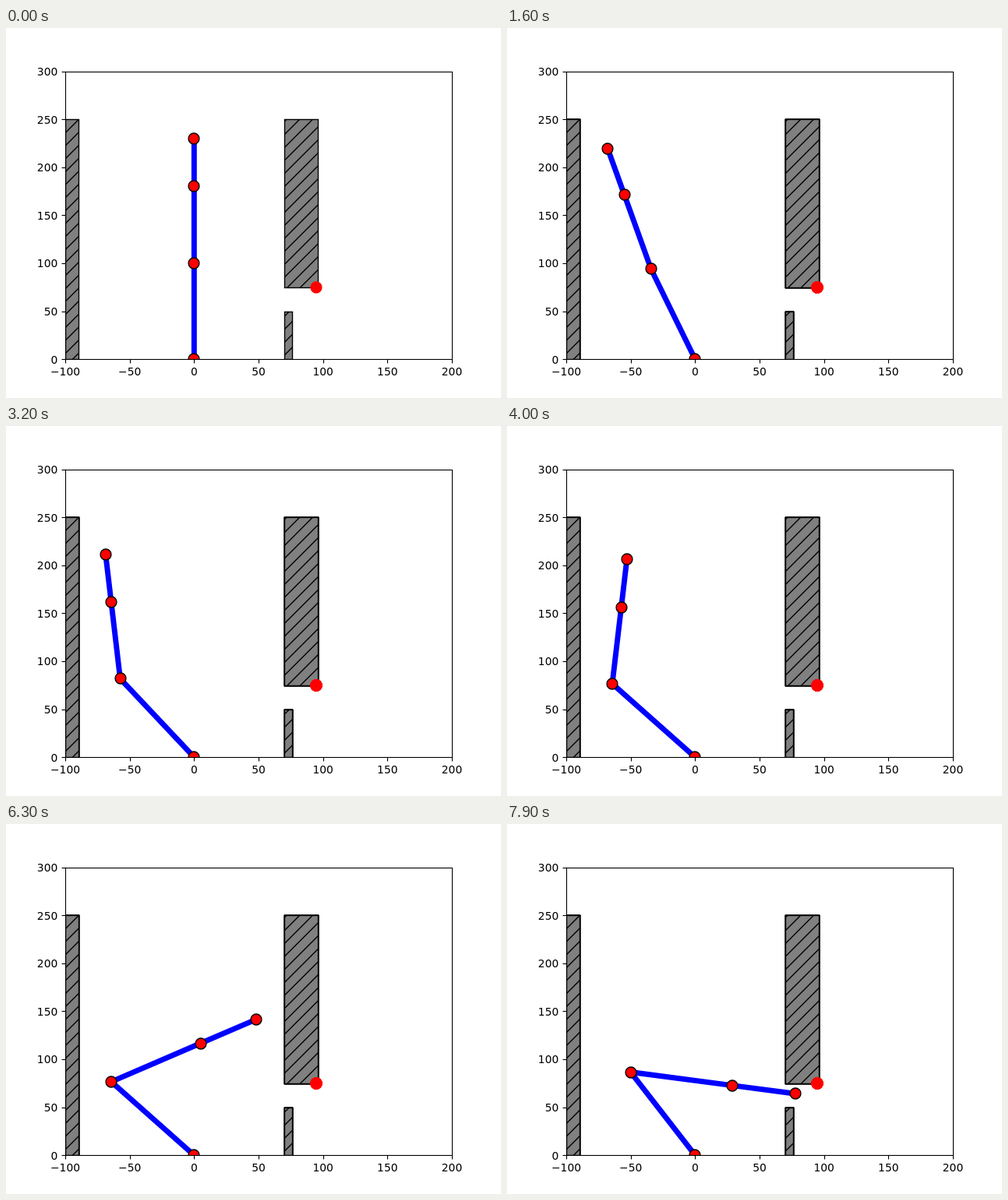
An HTML page with a canvas that plays this animation: 635 px wide and 475 px high, repeating every 8000 ms.

```html
<!DOCTYPE html>
<html lang="en">
<head>
<meta charset="utf-8">
<title>Arm path through a gap</title>
<style>
  html, body { margin: 0; width: 100%; height: 100%; overflow: hidden; background: #fff; }
  canvas { display: block; }
</style>
</head>
<body>
<canvas id="plot" width="635" height="475"></canvas>
<script>
const ctx = document.getElementById('plot').getContext('2d');
const W = 635, H = 475, LOOP = 8000;
const LEFT = 76, TOP = 55.6, WIDTH = 496, HEIGHT = 369.6;
const PT = 100 / 72;

const px = x => LEFT + (x + 100) * WIDTH / 300;
const py = y => TOP + HEIGHT - y * HEIGHT / 300;
const snap = v => Math.round(v) + 0.5;

const LINKS = [100, 80, 50];
const STEP = 5 * Math.PI / 180;
const WALLS = [[-100, 0, -90, 250], [70, 75, 96, 250], [70, 0, 76, 50]];
const GOAL = [95, 75];

// One joint turns by 5 degrees per move: a/A shoulder out/back, b elbow in.
const MOVES = 'aaaaba' + 'bbabba' + 'babbbbb' + 'b'.repeat(15) + 'AA';
const moveTime = i => (i < 19 ? 800 : 900) + 200 * i;

function armAt(t) {
  let shoulder = 0, elbow = 0;
  for (let i = 0; i < MOVES.length && moveTime(i) <= t; i++) {
    if (MOVES[i] === 'a') shoulder++;
    else if (MOVES[i] === 'A') shoulder--;
    else elbow++;
  }
  const upper = shoulder * STEP, fore = (shoulder - elbow) * STEP;
  const points = [[0, 0]];
  [upper, fore, fore].forEach((angle, i) => {
    const [x, y] = points[i];
    points.push([x - LINKS[i] * Math.sin(angle), y + LINKS[i] * Math.cos(angle)]);
  });
  return points;
}

function line(x1, y1, x2, y2) {
  ctx.beginPath();
  ctx.moveTo(x1, y1);
  ctx.lineTo(x2, y2);
  ctx.stroke();
}

function wall([x1, y1, x2, y2]) {
  const l = snap(px(x1)), r = snap(px(x2)), t = snap(py(y2)), b = snap(py(y1));
  ctx.fillStyle = '#808080';
  ctx.strokeStyle = '#000';
  ctx.lineWidth = PT;
  ctx.fillRect(l, t, r - l, b - t);
  ctx.save();
  ctx.beginPath();
  ctx.rect(l, t, r - l, b - t);
  ctx.clip();
  const gap = 100 / 6;
  for (let k = Math.floor((l + t) / gap); k * gap - 6 < r + b + gap; k++) {
    const sum = k * gap - 6;
    line(l - 3, sum - l + 3, r + 3, sum - r - 3);
  }
  ctx.restore();
  ctx.strokeRect(l, t, r - l, b - t);
}

function dot([x, y], edge) {
  ctx.beginPath();
  ctx.arc(Math.round(px(x)), Math.round(py(y)), 5 * PT, 0, 2 * Math.PI);
  ctx.fillStyle = '#f00';
  ctx.strokeStyle = edge;
  ctx.lineWidth = PT;
  ctx.fill();
  ctx.stroke();
}

function arm(points) {
  ctx.strokeStyle = '#00f';
  ctx.lineWidth = 5 * PT;
  ctx.lineCap = 'square';
  ctx.lineJoin = 'round';
  ctx.beginPath();
  for (const [x, y] of points) ctx.lineTo(px(x), py(y));
  ctx.stroke();
  ctx.lineCap = 'butt';
  ctx.lineJoin = 'miter';
  for (const p of points) dot(p, '#000');
}

function axes() {
  ctx.strokeStyle = ctx.fillStyle = '#000';
  ctx.lineWidth = 0.8 * PT;
  const l = snap(LEFT), r = snap(LEFT + WIDTH), t = snap(TOP), b = snap(TOP + HEIGHT);
  ctx.strokeRect(l, t, r - l, b - t);
  ctx.font = 10 * PT + 'px "DejaVu Sans", sans-serif';
  ctx.textBaseline = 'alphabetic';
  for (let v = -100; v <= 200; v += 50) {
    const x = snap(px(v));
    line(x, b, x, b + 5);
    ctx.textAlign = 'center';
    ctx.fillText(String(v).replace('-', '\u2212'), px(v), 446);
  }
  for (let v = 0; v <= 300; v += 50) {
    const y = snap(py(v));
    line(l - 5, y, l, y);
    ctx.textAlign = 'right';
    ctx.fillText(v, 66.3, Math.round(py(v) + 5.3));
  }
}

function draw(t) {
  ctx.fillStyle = '#fff';
  ctx.fillRect(0, 0, W, H);
  ctx.save();
  ctx.beginPath();
  ctx.rect(LEFT, TOP, WIDTH, HEIGHT);
  ctx.clip();
  // Overdrawing hardens the outlines once the arm has started its run.
  const passes = t < 500 ? 1 : 8;
  for (let i = 0; i < passes; i++) {
    WALLS.forEach(wall);
  }
  arm(armAt(t));
  for (let i = 0; i < passes; i++) dot(GOAL, '#f00');
  ctx.restore();
  axes();
}

const start = performance.now();
function tick() {
  draw((performance.now() - start) % LOOP);
  requestAnimationFrame(tick);
}
tick();
</script>
</body>
</html>
```
